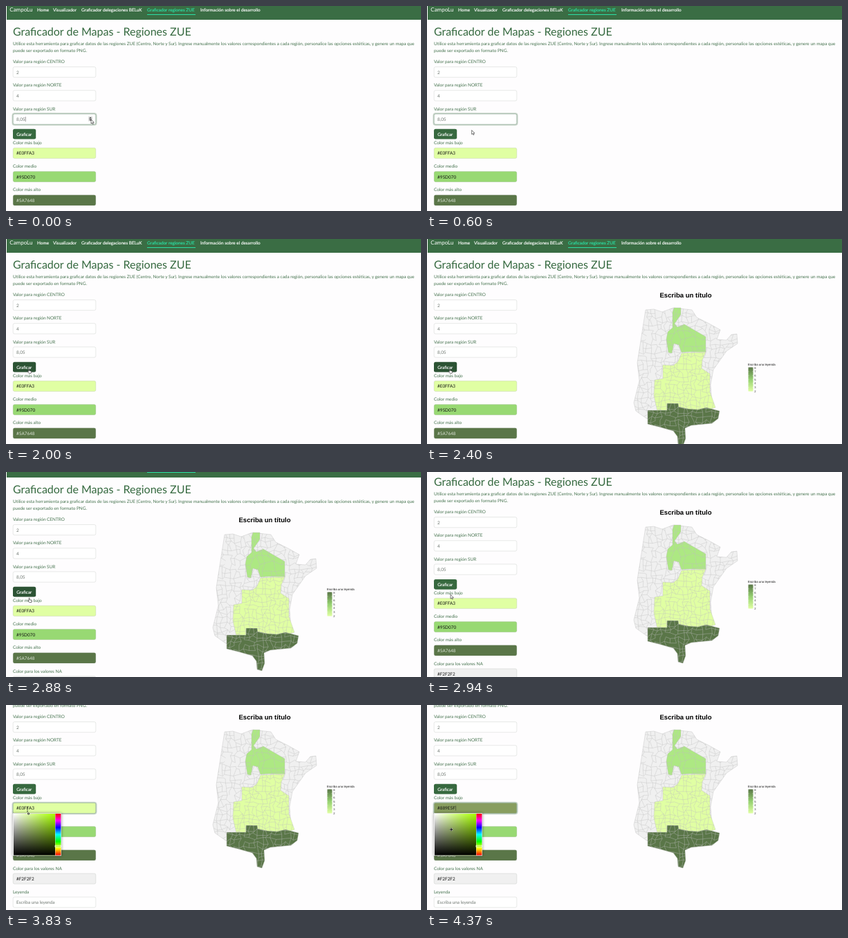
Write an HTML page that moves like this. It is 600 px wide and 298 px high and loops after 4420 ms.

```html
<!DOCTYPE html>
<html lang="es">
<head>
<meta charset="utf-8">
<title>Graficador de mapas</title>
<style>
  html, body { margin: 0; width: 100%; height: 100%; overflow: hidden; background: #fefdfe; }
  svg { display: block; width: 600px; height: 298px; }
  text { font: 6.4px Lato, sans-serif; fill: #45734e; text-rendering: geometricPrecision; white-space: pre; }
  .nav text { fill: #fff; stroke: #fff; stroke-width: .15; }
  .nav .on { fill: #2be0a5; stroke: #2be0a5; }
  .nav .brand { font-size: 8px; stroke-width: 0; }
  .h { font-size: 16px; fill: #35693f; }
  .plot text { font-family: "Liberation Sans", Arial, sans-serif; fill: #111; }
  .plot .title { font-size: 9.6px; font-weight: 700; fill: #000; }
  .plot .key { font-size: 4.4px; }
  .plot .tick { font-size: 4.2px; fill: #333; }
  .mesh { fill: none; stroke: #bdbdbd; stroke-width: .4; }
  .panel { filter: drop-shadow(0 0 2px rgba(0, 0, 0, .4)); }
  #pointer path { stroke: #222; stroke-width: .6; stroke-linejoin: round; }
</style>
</head>
<body>
<svg id="stage" viewBox="0 0 600 298"></svg>
<script>
const LOOP = 4420;
const BUTTON = { x: 33, y: 189 };
const LOW = '#E0FFA3', MID = '#95D070', HIGH = '#5A7648', PICKED = '#889E5F';
const ROW = 34.2;

// Smooth progress from 0 to 1 between two moments
function ease(t, from, to) {
  const k = Math.min(1, Math.max(0, (t - from) / (to - from)));
  return k * k * (3 - 2 * k);
}
const mix = (a, b, k) => a + (b - a) * k;

const channels = hex => [1, 3, 5].map(i => parseInt(hex.slice(i, i + 2), 16));
function mixHex(a, b, k) {
  const end = channels(b);
  return '#' + channels(a).map((v, i) =>
    Math.round(mix(v, end[i], k)).toString(16).padStart(2, '0')).join('').toUpperCase();
}

function randomizer(seed) {
  return () => (seed = (seed * 16807) % 2147483647) / 2147483647;
}

// Irregular grid that stands for the district borders
function mesh(points, cell, seed) {
  const xy = points.split(' ').map(p => p.split(',').map(Number));
  const [x0, y0, x1, y1] = [Math.min, Math.max].flatMap(f => [0, 1].map(i => f(...xy.map(p => p[i]))));
  const rnd = randomizer(seed), rows = [];
  let d = '';
  for (let y = y0; y < y1 + cell; y += cell) {
    const row = [];
    for (let x = x0; x < x1 + cell; x += cell)
      row.push([x, y].map(v => (v + (rnd() - .5) * cell * .9).toFixed(1)));
    rows.push(row);
  }
  rows.forEach((row, r) => row.forEach((p, c) => {
    for (const q of [row[c + 1], rows[r + 1]?.[c]])
      if (q && rnd() > .16) d += `M${p}L${q}`;
  }));
  return d;
}

function region(id, fill, cell, points) {
  return `<clipPath id="${id}"><polygon points="${points}"/></clipPath>
    <polygon points="${points}" fill="${fill}" stroke="#bdbdbd" stroke-width=".4"/>
    <path class="mesh" clip-path="url(#${id})" d="${mesh(points, cell, cell * 7 + points.length)}"/>`;
}

const map =
  region('land', '#f0f0f0', 6.5, '316,103 328,102 340,106 356,100 383,103 390,114 408,123 424,132 419,146 ' +
    '433,147 440,139 448,138 449,152 433,163 414,190 410,212 412,240 350,250 319,262 302,250 299,238 307,206 304,180') +
  region('north', '#ade883', 9, '355,106 357,100 367,100 367,110 358,123 362,128 372,124 403,142 403,164 376,164 ' +
    '368,165 364,154 357,152 354,166 349,165 346,146 348,135 355,129') +
  region('centre', '#e0ffa3', 6, '368,166 403,164 398,176 397,188 409,196 409,222 417,245 402,250 333,250 ' +
    '328,228 329,205 341,203 341,183 356,184 363,178') +
  region('south', HIGH, 6.5, '319,249 347,249 347,239 363,239 364,244 378,247 392,248 404,245 423,250 421,261 ' +
    '412,268 382,271 373,275 374,290 370,301 363,299 362,287 356,279 335,273 319,269');

const text = (x, y, s, cls = '') => `<text x="${x}" y="${y}" class="${cls}">${s}</text>`;

const box = (y, attrs) => `<rect x="10.2" y="${y}" width="119.6" height="15.2" rx="2.2" stroke-width=".5" ${attrs}/>`;

const ring = (id, y) => `<g id="${id}" fill="none">
  <rect x="9.4" y="${y - .8}" width="121.2" height="16.8" rx="3" stroke="#37693f" stroke-opacity=".28" stroke-width="1.7"/>
  ${box(y, 'stroke="#93b09a"')}</g>`;

const caret = (id, x, y) => `<path id="${id}" d="M${x} ${y}v7" stroke="#222" stroke-width=".5"/>`;

// The button takes part of a row between the third and fourth field
const labelY = i => 83.1 + ROW * i + (i > 2 ? 15.2 : 0);

const fields = [
  ['Valor para región CENTRO', '2'],
  ['Valor para región NORTE', '4'],
  ['Valor para región SUR', '8,05'],
  ['Color más bajo', LOW, LOW, '#111'],
  ['Color medio', MID, '#98d973', '#111'],
  ['Color más alto', HIGH, HIGH, '#dfe6da'],
  ['Color para los valores NA', '#F2F2F2', '#f0f0f0', '#111'],
  ['Leyenda', 'Escriba una leyenda']
].map(([label, value, fill = '#fff', ink = '#6c756e'], i) => {
  const y = labelY(i);
  return text(10, y, label) +
    box(y + 5.4, `id="box${i}" fill="${fill}" stroke="#8a988c" stroke-opacity=".4"`) +
    `<text id="value${i}" x="15" y="${y + 15.4}" style="fill:${ink}">${value}</text>`;
}).join('');

const gradient = (id, vertical, list) => `<linearGradient id="${id}" ${vertical ? 'x2="0" y2="1"' : ''}>
  ${list.map((c, i) => `<stop offset="${i / (list.length - 1)}" stop-color="${c}"/>`).join('')}</linearGradient>`;
const hues = Array.from({ length: 7 }, (_, i) => `hsl(${360 - i * 60} 100% 50%)`);

const legend = Array.from({ length: 7 }, (_, i) => {
  const y = 187 + i * 5.7;
  return text(473.2, y + 1.5, 8 - i, 'tick') +
    `<path d="M464.5 ${y}h1.4m4.2 0h1.4" stroke="#fff" stroke-width=".3"/>`;
}).join('');

const nav = [[45, 'Home'], [68, 'Visualizador'], [109, 'Graficador delegaciones BELuK'],
  [204, 'Graficador regiones ZUE', 'on'], [281, 'Información sobre el desarrollo']]
  .map(item => text(item[0], 7.5, ...item.slice(1))).join('');

document.getElementById('stage').innerHTML = `
<defs>
  ${gradient('scale', true, [HIGH, MID, LOW])}
  ${gradient('sat', false, ['#fff', 'hsl(81 100% 50%)'])}
  ${gradient('val', true, ['#0000', '#000'])}
  ${gradient('hue', true, hues)}
</defs>
<rect width="600" height="298" fill="#fefdfe"/>
<g id="page">
  <g class="nav">
    <rect x="1" y="-2" width="599" height="22" fill="#3a6d44"/>
    ${text(5.3, 7.8, 'CampoLu', 'brand')}
    ${nav}
    <rect x="204" y="12" width="70" height="1" fill="#2be0a5"/>
  </g>
  ${text(10, 43.4, 'Graficador de Mapas - Regiones ZUE', 'h')}
  ${text(10, 57.4, 'Utilice esta herramienta para graficar datos de las regiones ZUE (Centro, Norte y Sur). Ingrese manualmente los valores correspondientes a cada región, personalice las opciones estéticas, y genere un mapa que')}
  ${text(10, 67, 'puede ser exportado en formato PNG.')}
  ${fields}
  <g id="focus-south">${ring('ring-south', labelY(2) + 5.4)}</g>
  ${caret('caret-south', 28.2, 161)}
  <g id="spin"><rect x="119" y="160.5" width="6" height="7" rx=".6" fill="#dcdcdc"/>
    <path d="M120.2 163.4l1.8-2 1.8 2zM120.2 164.7l1.8 2 1.8-2z" fill="#333"/></g>
  <rect id="button" x="10" y="178.8" width="33.2" height="14.8" rx="2.4"/>
  <text x="15.2" y="188.5" style="fill:#fff;stroke:#fff;stroke-width:.15">Graficar</text>
  <g id="plot" class="plot">
    <text x="374" y="85" text-anchor="middle" class="title">Escriba un título</text>
    ${map}
    ${text(464, 183.6, 'Escriba una leyenda', 'key')}
    <rect x="464.5" y="186.5" width="7" height="35" fill="url(#scale)"/>
    ${legend}
  </g>
  <g id="picker">
    ${ring('ring-low', labelY(3) + 5.4)}
    ${caret('caret-low', 41.6, 210.4)}
    <rect class="panel" x="10" y="221.2" width="70" height="62" fill="#eee"/>
    <rect x="11" y="222" width="60" height="60.4" fill="url(#sat)"/>
    <rect x="11" y="222" width="60" height="60.4" fill="url(#val)"/>
    <rect x="71.4" y="222" width="8" height="60.4" fill="url(#hue)"/>
    <rect x="71" y="268.2" width="8.8" height="2.2" fill="none" stroke="#fff" stroke-width=".7"/>
    <g id="marker" fill="none"><circle r="1.7" stroke="#fff" stroke-width=".8"/>
      <circle r="1.2" stroke="#111" stroke-width=".9"/></g>
  </g>
</g>
<g id="pointer">
  <path id="arrow" d="M0 0v6l1.4-1.2 1 2.1 1-.5-1-2 1.9-.1z" fill="#fff"/>
  <path id="hand" d="M-.5 0q.6-.7 1.1 0v2.4l2.5.6q.7.2.6 1l-.5 2.2h-3l-2-2.4q0-.8.8-.5l.5.4z" fill="#fff"/>
  <path id="beam" d="M-1-3.2h2M0-3.2v6.4M-1 3.2h2"/>
  <path id="cross" d="M-2.5 0h5M0-2.5v5"/>
</g>`;

const el = id => document.getElementById(id);
const show = (id, on) => el(id).setAttribute('visibility', on ? 'inherit' : 'hidden');
const move = (id, x, y) => el(id).setAttribute('transform', `translate(${x} ${y})`);

function pointerKind(t) {
  if (t < 800) return 'arrow';
  if (t < 2940) return 'hand';
  if (t < 3630) return 'arrow';
  return t < 3930 ? 'beam' : 'cross';
}

function draw(t) {
  const reach = ease(t, 0, 1000), drift = ease(t, 2750, 3220);
  const aim = ease(t, 3530, 3730), drag = ease(t, 3930, 4370);

  move('page', 0, -64 * drift);
  move('pointer',
    mix(123, BUTTON.x, reach) + 3 * drift - 5 * aim + 4 * drag,
    mix(165, BUTTON.y, reach) - 30 * drift - 7 * aim + 29 * drag);
  for (const kind of ['arrow', 'hand', 'beam', 'cross']) show(kind, kind === pointerKind(t));

  show('focus-south', t < 1200);
  show('caret-south', t < 1200 && t % 1000 < 500);
  show('spin', t < 400);
  el('button').setAttribute('fill', t >= 800 && t < 2940 ? '#2c5334' : '#37693f');
  show('plot', t >= 2100);

  show('picker', t >= 3730);
  show('caret-low', t >= 4210);
  move('marker', 32.6 + 2.6 * drag, 222 + 23 * drag);
  const color = mixHex(LOW, PICKED, drag);
  el('box3').setAttribute('fill', color);
  el('value3').textContent = color;
}

let start;
function loop(now) {
  start ??= now;
  draw(Math.max(0, now - start) % LOOP);
  requestAnimationFrame(loop);
}
draw(0);
requestAnimationFrame(loop);
</script>
</body>
</html>
```
